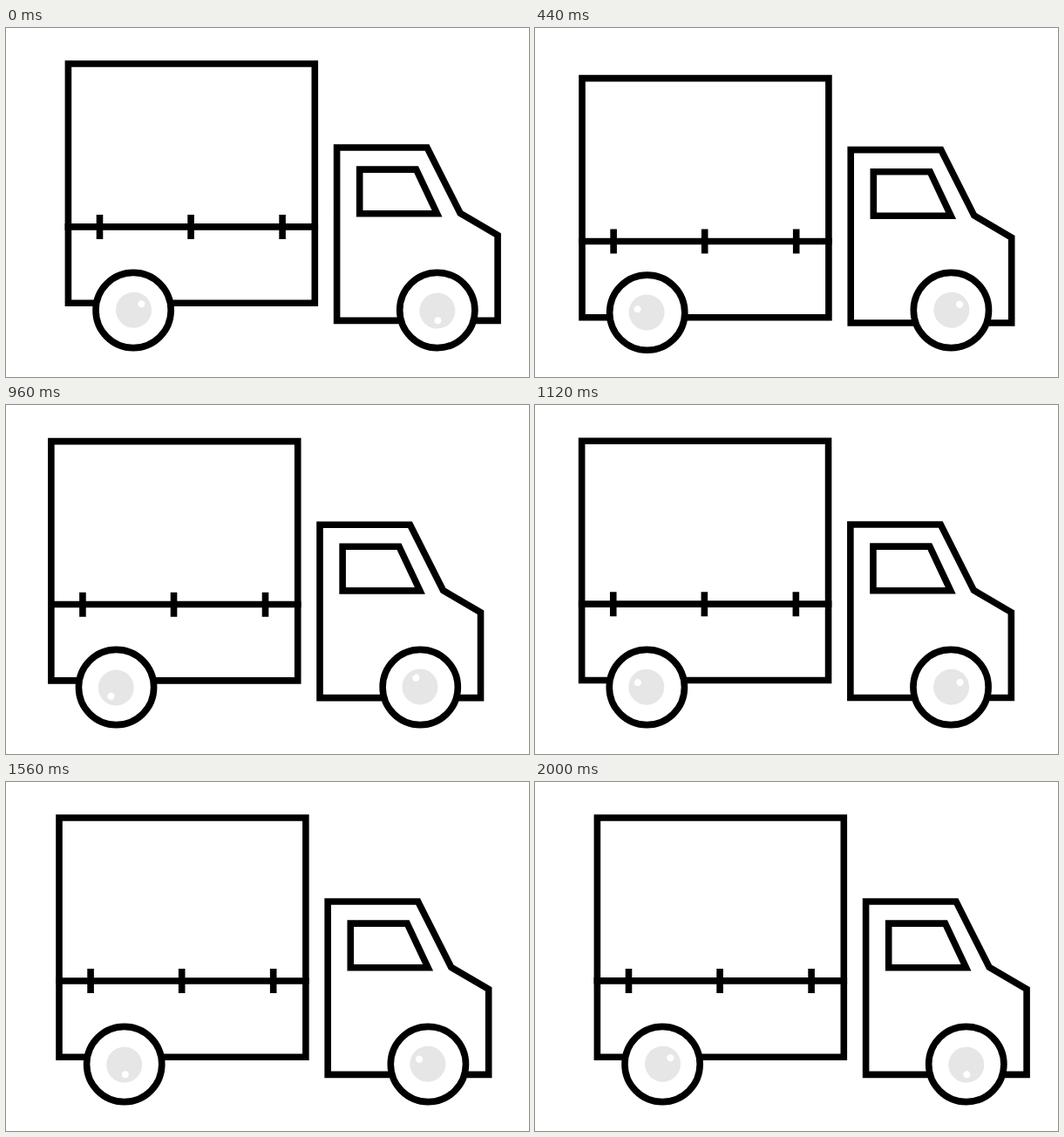
These frames come from a looping animation (600 by 400 pixels, 2040 ms). An HTML page:

```html
<!DOCTYPE html>
<html lang="en">
<head>
<meta charset="utf-8">
<title>Truck</title>
<style>
html, body { margin: 0; width: 100%; height: 100%; overflow: hidden; background: #fff; }
svg { display: block; width: 600px; height: 400px; }
.line { fill: #fff; stroke: #000; stroke-width: 7.6; }
</style>
</head>
<body>
<svg viewBox="0 0 600 400">
  <defs>
    <g id="hub">
      <circle cx=".6" r="20.5" fill="#e6e6e6"/>
      <circle cx="11.8" r="4" fill="#fff"/>
    </g>
  </defs>
  <g id="truck">
    <g id="box" class="line">
      <path d="M71.3 41H354.2V315.2H71.3Z"/>
      <path d="M67.5 227.9H358M107.4 214V242M212 214V242M317 214V242"/>
    </g>
    <g id="cab" class="line">
      <path d="M379.5 137H483L521 212.3L564 237.5V335.4H379.5Z"/>
      <path d="M405.6 162.1H470.5L494.4 212.7H405.6Z"/>
    </g>
    <g id="rear"><circle class="line" r="43.1"/><use href="#hub"/></g>
    <g id="front"><circle class="line" r="43.1"/><use href="#hub"/></g>
  </g>
</svg>
<script>
const LOOP = 2040, CYCLE = 2000, STEP = 40;
const el = id => document.getElementById(id);
const smooth = u => u * u * (3 - 2 * u);

// Roll ahead with growing speed, then get thrown back by the bump
function drive(t) {
  const ahead = 4.6, range = 26.4, hit = 160, back = 540;
  if (t >= hit && t < back) return ahead - range * smooth((t - hit) / (back - hit));
  const since = (t < hit ? t + CYCLE : t) - back;
  return ahead - range + range * (since / (CYCLE + hit - back)) ** 1.8;
}

// Sink for 200 ms, then swing out like a damped spring while a small sag fades
function bounce(t, start, swing, sag) {
  const s = t - start - 200;
  if (s < -200) return 0;
  if (s < 0) return (swing + sag) * smooth(1 + s / 200);
  const settle = sag * Math.exp(-s / 400) * (1 - t / CYCLE) / (1 - (start + 200) / CYCLE);
  return swing * Math.exp(-s / 125) * Math.cos(2 * Math.PI * s / 280) + settle;
}

// A wheel drops and climbs back
function dip(t, start) {
  const u = (t - start) / 240;
  return u > 0 && u < 1 ? 7 * Math.sin(Math.PI * u) : 0;
}

function place(id, x, y) {
  el(id).setAttribute("transform", `translate(${x} ${y})`);
}

function wheel(id, x, y, angle) {
  place(id, x, y);
  el(id).querySelector("use").setAttribute("transform", `rotate(${angle})`);
}

function draw(t) {
  const turn = 1080 * t / CYCLE;
  place("truck", drive(t), 0);
  place("box", 0, bounce(t, 250, 13.7, 3));
  place("cab", 0, bounce(t, 190, 6, 1));
  wheel("rear", 146, 323.5 + dip(t, 230), turn - 38);
  wheel("front", 494.7, 323.5 + dip(t, 140), turn + 87);
}

const start = performance.now();
function tick() {
  const t = (performance.now() - start) % LOOP;
  draw(Math.floor(t / STEP) * STEP);
  requestAnimationFrame(tick);
}
tick();
</script>
</body>
</html>
```
